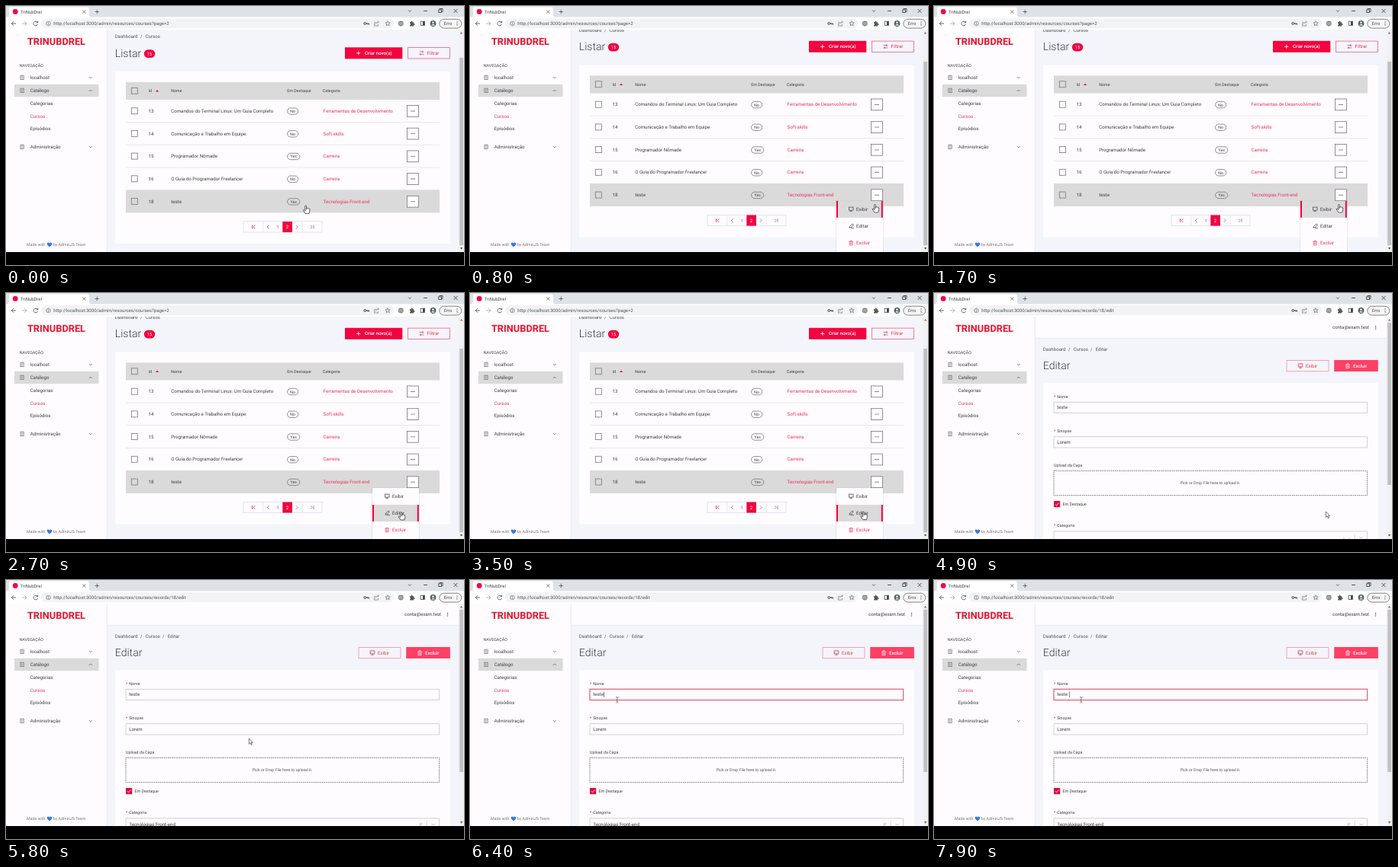
An HTML page that plays this animation: 600 px wide and 340 px high, repeating every 8 s.

```html
<!DOCTYPE html>
<html lang="pt">
<head>
<meta charset="utf-8">
<style>
html, body { margin: 0; width: 100%; height: 100%; overflow: hidden; background: #000; }
svg { display: block; width: 600px; height: 340px; }
text { font-family: Roboto, sans-serif; white-space: pre; text-rendering: geometricPrecision; }
</style>
</head>
<body>
<svg id="stage" viewBox="0 0 600 340"></svg>
<script>
const RED = '#f2053f', SOFT = '#ea3358', INK = '#3d3d42', GREY = '#777', PAPER = '#fefcfe';
const BOTTOM = 323;

// Drawing helpers, each returning SVG markup
const rect = (x, y, w, h, fill, more = '') =>
  `<rect x="${x}" y="${y}" width="${w}" height="${h}" fill="${fill}" ${more}/>`;
const box = (x, y, w, h, stroke, fill = 'none', more = '') =>
  rect(x, y, w, h, fill, `stroke="${stroke}" stroke-width=".8" ${more}`);
const line = (d, stroke = '#555', w = .8, more = '') =>
  `<path d="${d}" fill="none" stroke="${stroke}" stroke-width="${w}" ${more}/>`;
const shape = (d, fill) => `<path d="${d}" fill="${fill}"/>`;
const dot = (x, y, r, fill, more = '') => `<circle cx="${x}" cy="${y}" r="${r}" fill="${fill}" ${more}/>`;
// y is the middle of the line of text
const text = (x, y, s, fill = INK, size = 6.15, more = '') =>
  `<text x="${x}" y="${y + size * .355}" font-size="${size}" fill="${fill}" ${more}>${s}</text>`;
const title = (y, s) => text(142.8, y, s, INK, 14.06, 'font-weight="300"');
const mid = 'text-anchor="middle"';
const group = (id, body) => `<g id="${id}">${body}</g>`;
const chevron = (x, y, dir, stroke = '#666', r = 2) =>
  line(`M${x - r} ${y - dir * r / 2}L${x} ${y + dir * r / 2}L${x + r} ${y - dir * r / 2}`, stroke);
const angle = (x, y, dir, stroke) => line(`M${x - dir} ${y - 2.2}l${dir * 2.2} 2.2l${-dir * 2.2} 2.2`, stroke);
const screen = (x, y, c) => box(x - 2.8, y - 2.5, 5.6, 4, c) + line(`M${x} ${y + 1.5}v1.5M${x - 1.5} ${y + 3}h3`, c);
const bin = (x, y, c) => line(`M${x - 2.7} ${y - 1.8}h5.4M${x - 1} ${y - 1.8}v-1h2v1M${x - 2} ${y - 1.8}v4.7h4v-4.7M${x - .6} ${y - .5}v2.2M${x + .6} ${y - .5}v2.2`, c, .65);
const kebab = (x, y, fill = '#444', gap = 1.9) => [-1, 0, 1].map(i => dot(x, y + i * gap, .6, fill)).join('');

function browser() {
  return rect(0, 0, 600, 15, '#dee1e6') +
    shape('M2 15Q4 14 4 12V4Q4 1.5 6 1.5H107Q109 1.5 109 4V12Q109 14 111 15Z', '#fff') +
    dot(12.2, 7.4, 3.4, RED) + text(19, 7.5, 'TriNubDrel', '#444', 5.9) +
    line('M100.3 5.5l4 4m0-4l-4 4M116.5 7.5h5.4m-2.7-2.7v5.4') +
    chevron(529, 6.5, 1, '#444') +
    line('M547 6.5h5M586.5 4l5 5m0-5l-5 5M568 4.5v-1h4v4h-1', '#333') + box(566.8, 4.8, 3.8, 3.8, '#333') +
    rect(0, 14.5, 600, 16.5, '#fff') + rect(46, 16.2, 462, 13, '#f1f3f4', 'rx="6.5"') +
    line('M13 23H7.3m2.8-2.8L7.3 23l2.8 2.8', '#555', .9) +
    line('M21.3 23H27m-2.8-2.8L27 23l-2.8 2.8', '#aaa', .9) +
    line('M41 21.2A2.8 2.8 0 1 0 41.6 23.8M41.8 19.7v2.2h-2.2', '#555', .9) +
    dot(55.5, 23, 2.7, 'none', 'stroke="#666" stroke-width=".7"') + line('M55.5 22.6v2M55.5 21.2v.7', '#666') +
    `<text id="url" x="62.3" y="25.2" font-size="6.05" fill="#555"></text>` +
    dot(470.3, 23, 1.4, 'none', 'stroke="#444"') + line('M471.8 23h3.6v1.6m-1.5-1.6v1.4', '#444', 1) +
    line('M484.5 21.5h-2v4.6h5v-2M484 24q.4-3 4.3-3m-1.6-1.6l1.7 1.6l-1.7 1.6', '#777', .7) +
    line('M500.2 19.7l.9 2.1l2.3.2l-1.8 1.5l.6 2.3l-2-1.2l-2 1.2l.6-2.3l-1.8-1.5l2.3-.2z', '#666', .7) +
    dot(517.3, 23, 3.4, '#858585') + line('M515 22h4.6M515 24h4.6', '#ddd', .7) +
    shape('M529 21.2h1.7q-.2-1.8.9-1.8t.9 1.8h1.7v1.8q1.5-.1 1.5.9t-1.5.9v1.7h-5.2v-1.7q1.2 0 1.2-.9t-1.2-.9z', '#555') +
    box(543.2, 20.2, 5.2, 5.2, '#444') + rect(546, 20.2, 2.4, 5.2, '#444') +
    dot(559.5, 23, 3.9, '#56616d') + dot(559.5, 21.8, 1.3, '#fff') + shape('M557 25.4q2.5-2.8 5 0z', '#fff') +
    box(567.8, 17.3, 29, 11.8, '#666', '#f6f6f7', 'rx="5.9"') +
    text(579, 23.1, 'Erro', '#444', 5.8, mid) + kebab(591, 23, '#444');
}

function navIcon(y) {
  return box(19, y - 2.8, 4.2, 5.4, '#777') + line(`M20 ${y - 1}h2.2M20 ${y + .7}h2.2`, '#777', .7);
}
function sidebar() {
  const heads = [['localhost', 94, 1], ['Catálogo', 111, -1], ['Administração', 185, 1]];
  const subs = [['Categorias', 127.6], ['Cursos', 144.4, SOFT], ['Episódios', 161.3]];
  return rect(0, 31, 132, BOTTOM - 31, PAPER) + rect(131.8, 31, .8, BOTTOM - 31, '#e3e4ea') +
    text(66, 46, 'TRINUBDREL', '#e5142f', 12.8, mid + ' font-weight="700"') +
    text(17.8, 78.6, 'NAVEGAÇÃO', '#444', 5.3) + rect(11, 102.8, 110.5, 16.4, '#dadada') +
    heads.map(([s, y, dir]) => navIcon(y) + text(31.8, y, s) + chevron(110.8, y, dir)).join('') +
    subs.map(([s, y, c]) => text(31.8, y, s, c)).join('') +
    text(27, 313.3, 'Made with', GREY, 5.3) + text(61.8, 313.3, 'by AdminJS Team', GREY, 5.3) +
    shape('M57 316.4l-3-3q-.8-2.5 1.2-2.8q1.2 0 1.8 1.1q.6-1.1 1.8-1.1q2 .3 1.2 2.8z', '#3977d8');
}

function scrollbar(id) {
  return rect(593, 31, 7, BOTTOM - 31, '#f1f1f1') + shape('M594.8 36.5h3.6l-1.8-2.4z', '#777') +
    shape('M594.8 317h3.6l-1.8 2.4z', '#555') + rect(594.2, 39, 4.8, 213, '#c1c1c1', `id="${id}"`);
}

const rows = [
  [13, 'Comandos do Terminal Linux: Um Guia Completo', 'No', 'Ferramentas de Desenvolvimento'],
  [14, 'Comunicação e Trabalho em Equipe', 'No', 'Soft-skills'],
  [15, 'Programador Nômade', 'Yes', 'Carreira'],
  [16, 'O Guia do Programador Freelancer', 'No', 'Carreira'],
  [18, 'teste', 'Yes', 'Tecnologias Front-end']
];
const check = y => box(164.3, y - 4, 8, 8, '#777');
function row([id, name, star, kind], i) {
  const y = 137.7 + i * 29.7, wide = star == 'Yes' ? 16.2 : 14.2;
  return (i == 4 ? rect(157, y - 14.8, 411, 29.7, '#dadada') : rect(157, y + 14.5, 411, .7, '#dfe0e4')) +
    check(y) + text(186.5, y, id) + text(216.2, y, name) +
    box(368.6, y - 3.8, wide, 8.4, '#777', 'none', 'rx="4.2"') +
    text(368.6 + wide / 2, y + .5, star, INK, 5.2, mid) + text(415.6, y, kind, SOFT) +
    box(525.6, y - 7.2, 14.8, 14.8, '#777', i == 4 ? '#fff' : 'none') +
    [-2, 0, 2].map(d => dot(533 + d, y + .2, .65, '#444')).join('');
}
function list() {
  return text(142.8, 40.2, 'Dashboard', '#555') + text(176, 40.2, '/', '#555') + text(182.5, 40.2, 'Cursos', '#555') +
    title(61.6, 'Listar') + rect(180.8, 57.2, 14.4, 10.8, RED, 'rx="5.4"') +
    text(188, 62.6, '15', '#fff', 5.5, mid) +
    rect(444, 54.3, 75.3, 15, RED) + line('M459.3 61.8h5m-2.5-2.5v5', '#fff', .9) +
    text(470, 61.8, 'Criar novo(a)', '#fff', 6.15, 'font-weight="500"') +
    box(526.6, 54.6, 55, 14.4, '#f0607c') + line('M541.5 60h6M541.5 63.4h6M545.8 58.8v2.4M543.2 62.2v2.4', SOFT, .7) +
    text(551.6, 61.8, 'Filtrar', SOFT) +
    rect(143, 86, 439, 226, PAPER) + rect(157, 100, 411, 23, '#dadada') + check(111.3) +
    text(186.5, 111.3, 'Id', INK, 5.3) + shape('M196 112.6h4.2l-2.1-2.7z', RED) +
    text(216.2, 111.3, 'Nome', INK, 5.3) + text(368.2, 111.3, 'Em Destaque', INK, 5.3) +
    text(414.8, 111.3, 'Categoria', INK, 5.3) + rows.map(row).join('') +
    box(311, 282.8, 103, 14.2, '#dcdde3') + line('M336.8 283v14M388 283v14', '#e4e5ea') +
    rect(362.3, 283, 12.7, 14, RED) + angle(325.3, 290, -1, RED) + line('M322.6 287.6v4.8', RED) +
    angle(343.5, 290, -1, RED) + text(356, 290, '1', SOFT, 6.15, mid) + text(368.6, 290, '2', '#fff', 6.15, mid) +
    angle(381, 290, 1, '#777') + angle(400, 290, 1, '#777') + line('M403 287.6v4.8', '#777');
}
function menu() {
  return rect(479, 255.5, 63, 68, '#00000012') + rect(480, 256, 61, 67, PAPER) +
    group('hover', rect(480, 255.8, 61, 22, '#dadada') + rect(480, 255.8, 2, 22, RED) + rect(538.8, 255.8, 2, 22, RED)) +
    screen(499.2, 266.6, '#555') + text(506, 266.8, 'Exibir') +
    line('M497 291.2l.5-1.9l3.4-3.4l1.4 1.4l-3.4 3.4zM499 291.4h3.8', '#444') + text(506, 288.8, 'Editar') +
    bin(499.2, 311, SOFT) + text(506, 311, 'Excluir', SOFT);
}

const topbar = (right, x) => rect(132.6, 31, right - 132.6, 28, PAPER) + rect(132.6, 58.8, right - 132.6, .7, '#e3e4ea') +
  text(x, 45.2, 'conta@exam.test') + kebab(x + 56.6, 45.2);

const field = (y, label, value) =>
  text(157, y, '*', RED, 5.3) + text(161.2, y, label, INK, 5.3) +
  box(157, y + 7.6, 410.6, 14.3, '#c6c6cb', PAPER) + text(161.2, y + 14.6, value);
function form() {
  return topbar(593, 522) +
    text(142.8, 73.4, 'Dashboard', '#555') + text(176, 73.4, '/', '#555') + text(182.5, 73.4, 'Cursos', '#555') +
    text(205, 73.4, '/', '#555') + text(211.5, 73.4, 'Editar', '#555') +
    title(95.5, 'Editar') +
    box(462, 88.4, 55, 14.4, '#f58ea2') + screen(480, 95.4, SOFT) + text(487, 95.7, 'Exibir', SOFT) +
    rect(524.2, 88, 57.6, 15, '#fd4065') + bin(542, 95.7, '#fff') +
    text(549, 95.7, 'Excluir', '#fff', 6.15, 'font-weight="500"') +
    rect(143, 118, 439, BOTTOM - 118, PAPER) +
    field(135.7, 'Nome', 'teste') +
    group('focus', box(156.3, 142.6, 412, 15.8, '#f2053f30') + box(157, 143.3, 410.6, 14.3, '#dc4a62')) +
    rect(175.4, 146.7, .6, 7.2, '#333', 'id="caret"') +
    field(181.1, 'Sinopse', 'Lorem') + text(157, 226.2, 'Upload da Capa', INK, 5.3) +
    box(157, 233.4, 410.6, 32.3, '#555', 'none', 'stroke-dasharray="1.5 1"') +
    text(362, 249.5, 'Pick or Drop File here to upload it.', '#555', 5.27, mid) +
    rect(157, 273, 8.2, 8.2, '#e2083c') + line('M159 277.2l1.6 1.7l3-3.4', '#fff', .9) +
    text(168.5, 277.2, 'Em Destaque', INK, 5.3) +
    field(305.3, 'Categoria', '') +
    line('M551.2 316v8', '#ccc') + chevron(559.5, 321, 1, '#aaa') +
    group('loading', kebab(537, 323, '#bbb') + kebab(544, 323, '#bbb')) +
    group('chosen', text(161.2, 320.6, 'Tecnologias Front-end') + line('M541.4 318.8l3.6 3.6m0-3.6l-3.6 3.6', '#aaa'));
}

const bars = [0, 1, 2].map(i => rect(354.7 + i * 8.7, 0, 5.8, 13, '#ee0a38', `id="bar${i}"`)).join('');
const cursors =
  group('hand', line('M2.6 5.5V1Q2.6 0 1.6 0T.8 1V7L-.6 5.6Q-1.8 5.4-1.5 6.6L1 10.4H6L6.8 7.5V4.6Q6.6 3.6 5.6 4Q4.6 3 3.8 3.6L2.6 3.2', '#333', .8, 'style="fill:#fff"')) +
  group('arrow', line('M0 0V7.4L1.7 5.9L2.9 8.6L4 8.1L2.8 5.5H5z', '#444', .7, 'style="fill:#fff"')) +
  group('beam', line('M-1.5-3.5Q0-3.5 0-2.5V2.5Q0 3.5-1.5 3.5M1.5-3.5Q0-3.5 0-2.5M0 2.5Q0 3.5 1.5 3.5', '#444', .7));

stage.innerHTML = rect(0, 31, 600, BOTTOM - 31, '#f4f5fa') +
  group('listPage', group('content', list()) + group('popup', menu()) + scrollbar('thumb')) +
  group('waitPage', topbar(600, 529) + bars) +
  group('formPage', form() + scrollbar('formThumb')) +
  sidebar() + browser() + rect(0, BOTTOM, 600, 340 - BOTTOM, '#000') + group('mouse', cursors);

const $ = id => document.getElementById(id);
const show = (id, on) => $(id).setAttribute('display', on ? 'inline' : 'none');
const set = (id, attrs) => { for (const k in attrs) $(id).setAttribute(k, attrs[k]); };
const move = (id, x, y) => set(id, { transform: `translate(${x} ${y})` });

// Mouse stops: time, x, y
const path = [[0, 391, 262], [100, 391, 262], [500, 531, 255], [600, 531, 255], [800, 528.8, 260.5],
  [2100, 528.8, 260.5], [2500, 516, 287.5], [3000, 516, 287.5], [3300, 513.5, 287], [5400, 513.5, 287],
  [6100, 192.8, 157], [8000, 192.8, 157]];
function mouseAt(t) {
  const i = path.findIndex(p => p[0] > t), [t0, x0, y0] = path[i - 1], [t1, x1, y1] = path[i];
  const u = (t - t0) / (t1 - t0), e = u * u * (3 - 2 * u);
  return [x0 + (x1 - x0) * e, y0 + (y1 - y0) * e];
}

function draw(t) {
  const open = t >= 600, wait = t >= 3900 && t < 4900, edit = t >= 4900;
  show('listPage', t < 3900);
  show('waitPage', wait);
  show('formPage', edit);
  $('url').textContent = 'http://localhost:3000/admin/resources/courses' + (t < 3800 ? '?page=2' : '/records/18/edit');

  move('content', 0, open ? -8.5 : 0);
  show('popup', open);
  set('thumb', { y: open ? 73 : 68, height: open ? 241 : 246 });
  const [x, y] = mouseAt(t);
  move('hover', 0, y > 273 ? 22.2 : 0);

  for (let i = 0; i < 3; i++) {
    const phase = (Math.min(t, 4400) - 1970 + (2 - i) * 100) % 1000;
    const h = 12.7 + 6.3 * (1 - Math.min(Math.abs(phase) / 500, 1)) ** 4;
    set('bar' + i, { y: 95.2 - h / 2, height: h });
  }

  show('loading', t < 5200);
  show('chosen', t >= 5200);
  show('focus', t >= 6200);
  show('caret', t >= 6300 && t < 6900 || t >= 7400);
  move('caret', t >= 7700 ? 1.5 : 0, 0);

  const beam = edit && y < 158 && y > 142;
  show('beam', beam);
  show('hand', t < 3900);
  show('arrow', t >= 3900 && !beam);
  move('mouse', x, y);
}

const start = performance.now();
function tick() {
  draw((performance.now() - start) % 8000);
  requestAnimationFrame(tick);
}
tick();
</script>
</body>
</html>
```
